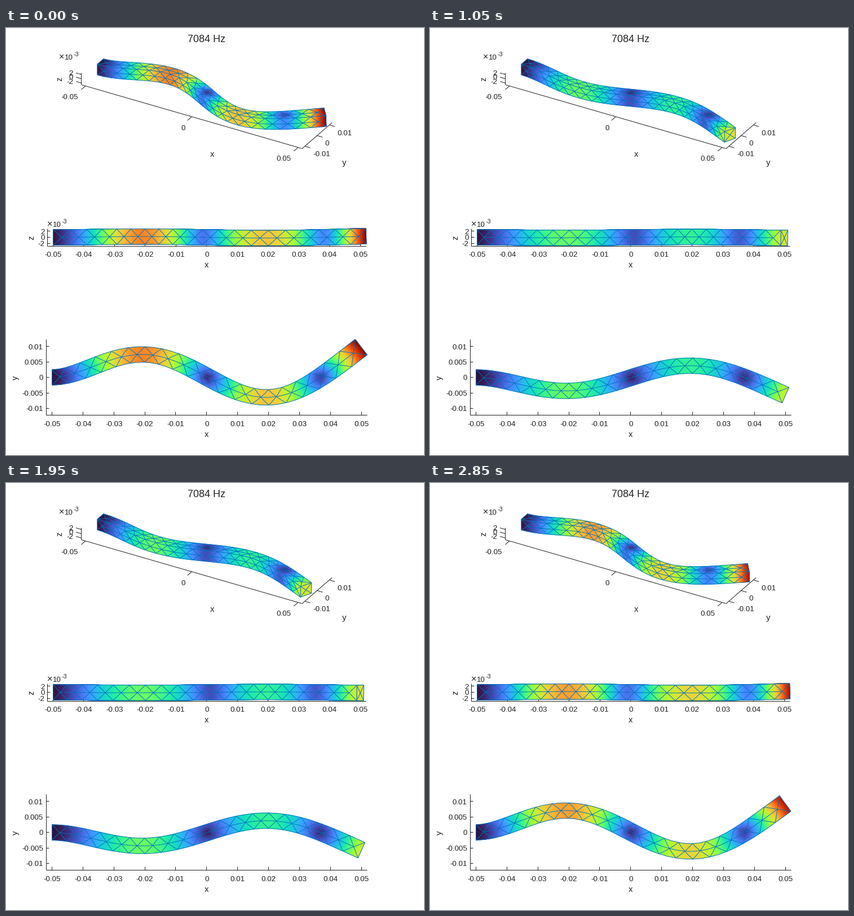
Recreate the animation shown at these times as a matplotlib script. Size 741 by 756 pixels, loop 3000 ms.

```python
import numpy as np
import matplotlib.pyplot as plt
from matplotlib.animation import FuncAnimation
from matplotlib.collections import LineCollection
from matplotlib.tri import Triangulation

W, H, DPI = 741, 756, 64
FRAMES, INTERVAL = 20, 150
PT = 72 / DPI                      # points per pixel
INK, EDGE = "#212121", "#0072BD"

# Beam, in millimetres
HALF, R, STEP = 50, 2.5, 5
TIP, Z_SHARE = 9.8, 0.035
BETA, SIGMA = 7.854757 / (2 * HALF), 0.99922450
LIM = np.array([51.9, 12.2, 2.85])

plt.rcParams["font.family"] = "Liberation Sans"
fig = plt.figure(figsize=(W / DPI, H / DPI), dpi=DPI, facecolor="white")
ax = fig.add_axes([0, 0, 1, 1])


def mode(x):
    """Third bending mode of a cantilever: deflection and slope."""
    b = BETA * x
    w = np.cosh(b) - np.cos(b) - SIGMA * (np.sinh(b) - np.sin(b))
    slope = BETA * (np.sinh(b) + np.sin(b) - SIGMA * (np.cosh(b) - np.cos(b)))
    return w, slope


TIP_W = mode(2.0 * HALF)[0]


def deform(p, amp):
    """Displaced points and the size of their displacement."""
    w, slope = (amp * TIP / TIP_W * m for m in mode(p[..., 0] + HALF))
    u = -slope * (p[..., 1] + Z_SHARE * p[..., 2])
    d = np.stack([u, w, Z_SHARE * w], axis=-1)
    return p + d, np.linalg.norm(d, axis=-1)


def split(t):
    """Cut each triangle into four."""
    a, b, c = t[:, 0], t[:, 1], t[:, 2]
    ab, bc, ca = (a + b) / 2, (b + c) / 2, (c + a) / 2
    parts = [(a, ab, ca), (ab, b, bc), (ca, bc, c), (ab, bc, ca)]
    return np.concatenate([np.stack(q, axis=1) for q in parts])


# Views: screen origin and a 3x2 projection matrix

def view(origin, *rows):
    return np.array(origin), np.array(rows)


def project(p, v):
    return v[0] + np.asarray(p) @ v[1]


S, C30 = 4.352, np.cos(np.pi / 6)
ISO = view((355.9, 123.3), (S * C30, S / 4), (S / 2, -S * C30 / 2), (0, -S * C30))
SIDE = view((355.75, 370.6), (5.445, 0), (0, 0), (0, -5.445))
PLAN = view((355.75, 618.6), (5.485, 0), (0, -5.48), (0, 0))


# Surface meshes

def strip():
    tris = []
    for x in range(-HALF, HALF, STEP):
        mid = (x + R, 0)
        for h in (-R, R):
            tris.append([(x, h), (x + STEP, h), mid])
            if x + STEP < HALF:
                tris.append([mid, (x + STEP + R, 0), (x + STEP, h)])
    for s in (-1, 1):
        tris.append([(s * HALF, -R), (s * HALF, R), (s * (HALF - R), 0)])
    return tris


def square():
    ring = [(-R, -R), (R, -R), (R, R), (-R, R)]
    return [[ring[i], ring[(i + 1) % 4], (0, 0)] for i in range(4)]


def place(tris, f):
    return [[f(*p) for p in t] for t in tris]


TOP = place(strip(), lambda s, t: (s, t, R))
BOTTOM = place(strip(), lambda s, t: (s, t, -R))
FRONT = place(strip(), lambda s, t: (s, -R, t))
END = place(square(), lambda s, t: (HALF, s, t))


class Face:
    def __init__(self, tris, v, z):
        self.view = v
        self.cells = split(np.array(tris, float))
        pairs = sorted({tuple(sorted((t[i], t[i - 1]))) for t in tris for i in range(3)})
        ends = np.array(pairs, float)
        self.edges = np.stack([ends[:, 0], ends.mean(axis=1), ends[:, 1]], axis=1)
        xy, mag = self.shade(1)
        self.tri = Triangulation(xy[:, 0], xy[:, 1], np.arange(len(xy)).reshape(-1, 3))
        self.mesh = ax.tripcolor(self.tri, mag, shading="gouraud", cmap="turbo",
                                 vmin=0, vmax=10, zorder=z)
        self.lines = LineCollection([], colors=EDGE, linewidths=0.95 * PT, zorder=z + 0.5)
        self.lines.set_snap(False)
        ax.add_collection(self.lines)

    def shade(self, amp):
        p, mag = deform(self.cells, amp)
        vals = np.concatenate([project(p, self.view), mag[..., None]], axis=-1)
        vals = split(vals).reshape(-1, 3)
        return vals[:, :2], vals[:, 2]

    def update(self, amp):
        xy, mag = self.shade(amp)
        self.tri.x, self.tri.y = xy[:, 0].copy(), xy[:, 1].copy()
        self.mesh.set_array(mag)
        self.lines.set_segments(project(deform(self.edges, amp)[0], self.view))


# Axes and labels

def line(a, b):
    # Snapping moves level and upright lines half a pixel down and right
    shift = 0.5 if np.isclose(a, b).any() else 0
    ax.plot([a[0] - shift, b[0] - shift], [a[1] - shift, b[1] - shift],
            color=INK, lw=PT, zorder=1, solid_capstyle="butt")


def tick(a, d, length):
    d = np.array(d, float)
    line(a, a + length * d / np.hypot(*d))


def text(x, y, s, px=13.33, ha="center", rot=0):
    ax.text(x, y, s, fontsize=px * PT, color=INK, ha=ha, va="baseline",
            rotation=rot, rotation_mode="anchor", zorder=1)


def number(x, y, s, ha="center"):
    text(x, y + 4.8, s, ha=ha)


def power(x, y):
    text(x - 1, y, "×", px=16, ha="left")
    text(x + 9.2, y, "10", ha="left")
    text(x + 24.2, y - 6, "-3", px=10.7, ha="left")


def flat_axes(v, up, ticks, label_x, label_y):
    """Left and bottom axis with inward ticks; up is the vertical data axis."""
    lo = -LIM
    top = lo.copy()
    top[up] = LIM[up]
    right = lo.copy()
    right[0] = LIM[0]
    corner = project(lo, v)
    line(corner, project(top, v))
    line(corner, project(right, v))
    for x in range(-HALF, HALF + 1, 10):
        p = np.array([project((x, 0, 0), v)[0], corner[1]])
        tick(p, (0, -1), 5.6)
        number(p[0], label_y, f"{x / 1000:g}")
    for val, s in ticks:
        q = np.zeros(3)
        q[up] = val
        p = np.array([corner[0], project(q, v)[1]])
        tick(p, (1, 0), 5.6)
        number(label_x, p[1], s, ha="right")


def iso_axes():
    lx, ly, lz = LIM
    corner = project((-lx, -ly, -lz), ISO)
    near = project((lx, -ly, -lz), ISO)
    line(corner, project((-lx, -ly, lz), ISO))
    line(corner, near)
    line(near, project((lx, ly, -lz), ISO))
    ex, ey, _ = ISO[1]
    for x, s, at in [(-50, "-0.05", (113, 121)), (0, "0", (314, 176)),
                     (50, "0.05", (493, 230))]:
        tick(project((x, -ly, -lz), ISO), -ey, 10)
        number(*at, s)
    for y, s, at in [(-10, "-0.01", (559.5, 222.5)), (0, "0", (569, 203.5)),
                     (10, "0.01", (600, 184.7))]:
        tick(project((lx, y, -lz), ISO), ex, 10)
        number(*at, s)
    for z, y in [(2, 79), (0, 86.3), (-2, 93.8)]:
        tick(project((-lx, -ly, z), ISO), -ex, 10)
        number(119, y, str(z), ha="right")


iso_axes()
flat_axes(SIDE, 2, [(z, str(z)) for z in (-2, 0, 2)], 68.5, 400.3)
flat_axes(PLAN, 1, [(y, f"{y / 1000:g}") for y in range(-10, 11, 5)], 66, 700)
power(95, 56)
power(74, 352.3)

text(355.5, 24.8, "7084 Hz", px=18)
for x, y, s, rot in [(365.5, 228, "x", 0), (599.5, 243, "y", 0), (99, 90.5, "z", 90),
                     (356, 424.5, "x", 0), (49, 371, "z", 90),
                     (356, 723.5, "x", 0), (21, 619, "y", 90)]:
    text(x, y, s, px=14.67, rot=rot)

# Painted from back to front in every view
layers = [(ISO, (END, TOP, FRONT)), (SIDE, (TOP, BOTTOM, END, FRONT)), (PLAN, (TOP,))]
faces = [Face(tris, v, 2 + i) for v, stack in layers for i, tris in enumerate(stack)]

ax.set_xlim(0, W)
ax.set_ylim(H, 0)
ax.axis("off")


def update(k):
    amp = np.cos(2 * np.pi * k / FRAMES)
    for face in faces:
        face.update(amp)
    return []


anim = FuncAnimation(fig, update, frames=FRAMES, interval=INTERVAL,
                     init_func=lambda: update(0), repeat=True, repeat_delay=0)
plt.show()
```
